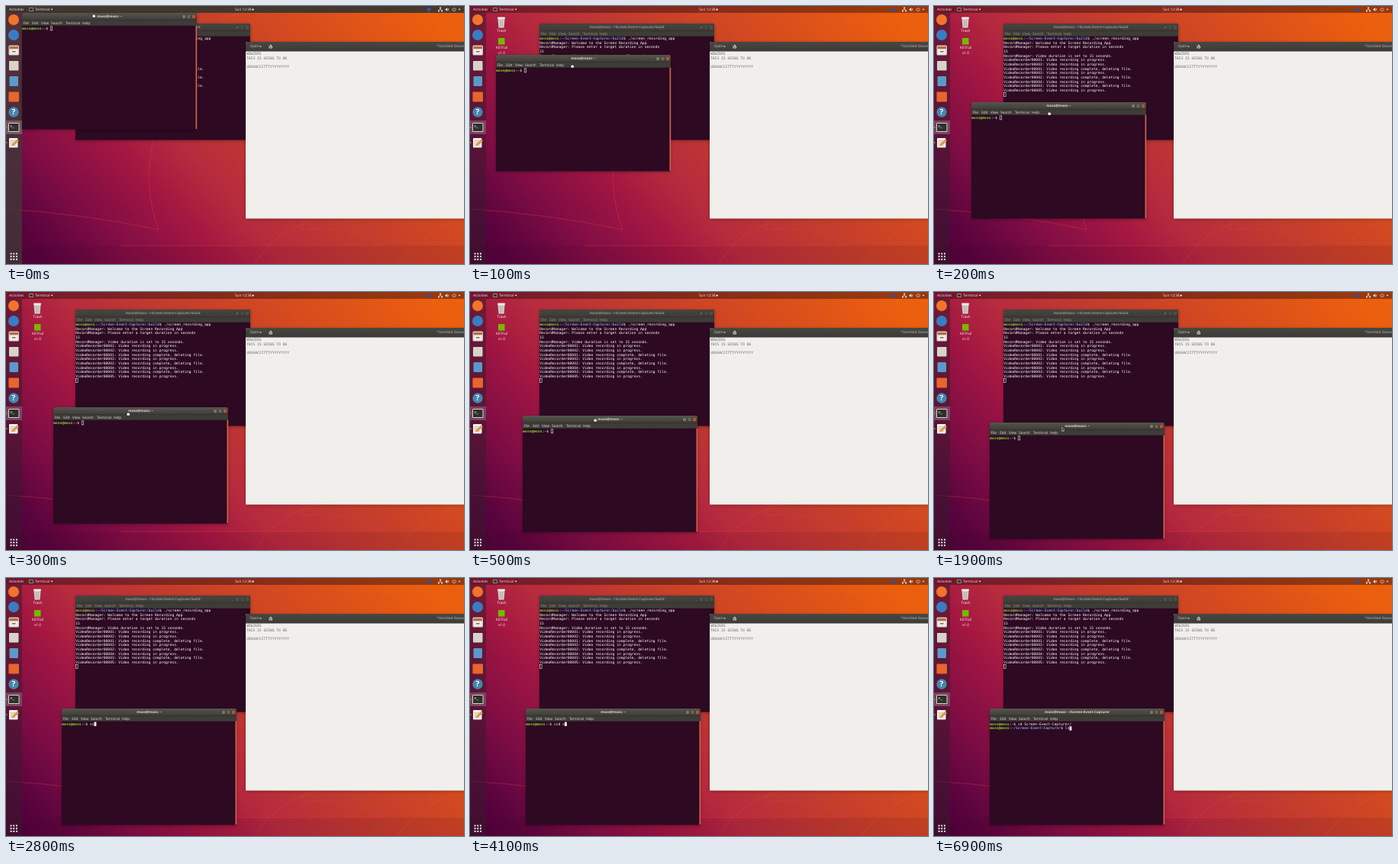
An HTML page with a canvas for the animation above (8 s loop, 600x338 px).

```html
<!DOCTYPE html>
<html lang="en">
<head>
<meta charset="utf-8">
<title>Desktop</title>
<style>
html, body { margin: 0; width: 100%; height: 100%; overflow: hidden; background: #a81247; }
canvas { display: block; width: 600px; height: 338px; }
</style>
</head>
<body>
<canvas id="stage"></canvas>
<script>
const W = 600, H = 338, LOOP = 8000;
const UI = '"Open Sans", "Noto Sans", sans-serif';
const MONO = '"DejaVu Sans Mono", "Liberation Mono", monospace';
const CELL = 2.815, LINE = 5.63;
const USER = 'moss@moss', DIR = '~/Screen-Event-Capturer';

const canvas = document.getElementById('stage');
const ctx = canvas.getContext('2d');
const dpr = window.devicePixelRatio || 1;
canvas.width = W * dpr;
canvas.height = H * dpr;
ctx.scale(dpr, dpr);
ctx.textBaseline = 'middle';
if ('textRendering' in ctx) ctx.textRendering = 'geometricPrecision';

// Drag steps: time, window x, window y, pointer x, pointer y
const drag = [
  [0, 21, 9, 115, 13],
  [100, 34, 64, 134, 79],
  [200, 49, 126, 151, 141],
  [300, 62, 151, 160, 160],
  [500, 69, 162, 164, 168],
  [600, 70, 165, 165, 170.5],
  [700, 71, 167, 166, 172],
  [800, 71, 168, 166, 173],
  [1600, 73, 171, 168, 177],
  [1900, 73, 171, 167.5, 177.5]
];

const typing = [[0, ''], [2700, 'c'], [2800, 'cc'], [4100, 'ccd s']];

const at = (steps, t) => steps.filter(s => s[0] <= t).pop();

function rect(x, y, w, h, fill) {
  ctx.fillStyle = fill;
  ctx.fillRect(x, y, w, h);
}

function round(x, y, w, h, r, fill) {
  ctx.fillStyle = fill;
  ctx.beginPath();
  ctx.roundRect(x, y, w, h, r);
  ctx.fill();
}

function dot(x, y, r, fill) {
  ctx.fillStyle = fill;
  ctx.beginPath();
  ctx.arc(x, y, r, 0, 7);
  ctx.fill();
}

function poly(points, fill, stroke) {
  ctx.beginPath();
  points.forEach(p => ctx.lineTo(...p));
  ctx.closePath();
  ctx.fillStyle = fill;
  ctx.fill();
  if (stroke) line('', stroke, 0.5, true);
}

function line(path, color, width, current) {
  ctx.strokeStyle = color;
  ctx.lineWidth = width;
  if (current) ctx.stroke();
  else ctx.stroke(new Path2D(path));
}

function text(s, x, y, color = '#eee', font = `4.7px ${UI}`, align = 'left') {
  ctx.font = font;
  ctx.textAlign = align;
  ctx.fillStyle = color;
  ctx.fillText(s, x, y);
}

function mono(s, x, y, color = '#fff', weight = '') {
  text(s, x, y, color, `${weight} 4.68px ${MONO}`);
  return x + s.length * CELL;
}

function wallpaper() {
  const g = ctx.createLinearGradient(0, 338, 470, -85);
  g.addColorStop(0, '#4a0038');
  g.addColorStop(0.08, '#58033d');
  g.addColorStop(0.19, '#7c0c44');
  g.addColorStop(0.33, '#a21642');
  g.addColorStop(0.43, '#b62a3e');
  g.addColorStop(0.58, '#c23b2e');
  g.addColorStop(0.76, '#d44a1f');
  g.addColorStop(1, '#ec5f0e');
  rect(0, 0, W, H, g);
  rect(0, 314, W, 24, 'rgba(60,0,25,.1)');
  line('M0 266Q100 272 200 293C180 240 182 175 220 110M150 314H496' +
    'M397 278Q384 288 389 293Q448 287 496 314', 'rgba(225,55,70,.4)', 1.2);
  line('M280 18Q345 -10 390 46M503 9Q492 25 485 46M326 338Q350 296 408 278' +
    'M512 338Q540 298 600 278', 'rgba(255,100,70,.28)', 0.7);
}

function desktopIcons() {
  poly([[36.5, 17], [45.5, 17], [44.5, 28.5], [37.5, 28.5]], '#d5cfcb');
  round(36, 14.5, 10, 2.6, 1, '#efebe8');
  line('M39 18L39.4 27M41 18V27M43 18L42.6 27', '#a29a98', 0.6);
  text('Trash', 41.5, 32.5, '#fff', undefined, 'center');
  rect(37, 42, 8.5, 8.5, '#76b900');
  text('KitTrial', 41.5, 55, '#fff', undefined, 'center');
  text('v1.0', 41.5, 61.5, '#fff', undefined, 'center');
}

function dock(solid) {
  rect(0, 9, 21, H - 9, solid ? 'rgba(66,54,56,.82)' : 'rgba(54,28,42,.5)');
  rect(0, 150, 21, 18, 'rgba(255,255,255,.2)');
  dot(10, 18, 7, '#f2742c');
  dot(10, 38, 7, '#397cc5');
  // file cabinet
  round(3.5, 51.5, 13.5, 13, 1.5, '#d8d0c5');
  rect(4.5, 53, 11.5, 3, '#b36d45');
  rect(5, 57, 10.5, 6.5, '#efebe4');
  rect(8, 59, 4.5, 1.5, '#77706a');
  round(4, 72, 12.5, 12.5, 1, '#d7d3c9');
  round(4.5, 92, 11.5, 13, 1, '#5a9acb');
  round(3.5, 112.5, 13.5, 13, 1, '#e7662b');
  dot(10, 139, 6.7, '#4585ad');
  text('?', 10, 139.3, '#fff', `bold 10px ${UI}`, 'center');
  // terminal launcher
  round(3, 153, 14.5, 12, 1.5, '#d6d3cb');
  rect(4, 154, 12.5, 10, '#302f2d');
  mono('>_', 5.5, 157.5, '#fff', 'bold');
  // editor launcher
  round(4, 173, 11.5, 12.5, 1, '#f1efea');
  for (let y = 176; y < 184; y += 2) rect(5.5, y, 7, 0.6, '#aaa69f');
  poly([[8, 181], [14.5, 174.5], [17, 177], [10, 183], [7.4, 183.3]], '#dd9c40');
  dot(0.7, 159, 0.9, '#ef6436');
  dot(0.7, 179, 0.9, '#ef6436');
  for (let i = 0; i < 9; i++)
    rect(5.6 + (i % 3) * 3.7, 323.5 + Math.floor(i / 3) * 3.7, 2, 2, '#f2edf0');
}

function panel(solid) {
  rect(0, 0, W, 9, solid ? 'rgba(56,54,48,.93)' : 'rgba(42,12,18,.45)');
  text('Activities', 4, 4.7, '#f0ecea');
  rect(30.5, 2.3, 5, 4.6, '#d8d4d0');
  rect(31, 2.8, 4, 3.6, '#333');
  text('Terminal', 38, 4.7, '#f0ecea');
  poly([[58.5, 3.8], [61.5, 3.8], [60, 5.6]], '#eee');
  text('Sun 12:38', 300, 4.7, '#f0ecea');
  dot(323.5, 4.6, 1.2, '#eee');
  dot(554, 4.6, 2.6, '#3d4e9d');
  rect(568, 1.7, 2, 1.5, '#eee');
  rect(566, 6, 1.7, 1.5, '#eee');
  rect(570.3, 6, 1.7, 1.5, '#eee');
  poly([[575.5, 3.8], [576.6, 3.8], [578.2, 2.2], [578.2, 7], [576.6, 5.5], [575.5, 5.5]], '#eee');
  line('M569 2.5V5M566.8 7V5H571.2V7M579.2 3Q580.5 4.6 579.2 6.2' +
    'M585.4 3A2.2 2.2 0 1 0 588.6 3M587 1.8V4.3', '#e6dfdc', 0.7);
  poly([[592.5, 3.8], [595.5, 3.8], [594, 5.6]], '#eee');
}

function frame(x, y, w, h, fill) {
  ctx.save();
  ctx.shadowColor = 'rgba(0,0,0,.3)';
  ctx.shadowBlur = 4 * dpr;
  ctx.shadowOffsetY = dpr;
  round(x, y, w, h, [2, 2, 0, 0], fill);
  ctx.restore();
}

function terminal(x, y, title, active) {
  const ink = active ? '#e4dfd7' : '#99958d';
  frame(x, y, 229, 152.5, '#2d0922');
  const g = ctx.createLinearGradient(0, y, 0, y + 9.5);
  g.addColorStop(0, active ? '#57554d' : '#464540');
  g.addColorStop(1, '#3d3c37');
  round(x, y, 229, 9.5, [2, 2, 0, 0], g);
  rect(x, y + 9.5, 229, 7.2, '#3d3c37');
  text(title, x + 114.5, y + 4.9, ink, `bold 4.5px ${UI}`, 'center');
  const signs = ['m-1 0h2', 'm-.9-.9h1.8v1.8h-1.8z', 'm-.8-.8l1.6 1.6m0-1.6l-1.6 1.6'];
  signs.forEach((sign, i) => {
    const bx = x + 212 + i * 6.5, close = active && i === 2;
    dot(bx, y + 5, 2.6, '#2f2e2a');
    dot(bx, y + 5, 2.2, close ? '#e95a31' : active ? '#85827a' : '#5b5952');
    line(`M${bx} ${y + 5}${sign}`, '#33312d', 0.5);
  });
  const menu = ['File', 'Edit', 'View', 'Search', 'Terminal', 'Help'];
  [1.5, 13.2, 25, 38, 57, 79].forEach((dx, i) => text(menu[i], x + dx, y + 13.5, ink));
  if (active) rect(x + 227.5, y + 16.7, 1.7, 135.3, '#cf664b');
}

function prompt(x, y, dir) {
  x = mono(USER, x, y, '#8ae234', 'bold');
  x = mono(':', x, y);
  x = mono(dir, x, y, '#729fcf', 'bold');
  return mono('$ ', x, y);
}

function caret(x, y, solid) {
  if (solid) return rect(x, y - 2.8, CELL, 5.4, '#fff');
  ctx.strokeStyle = '#eee';
  ctx.lineWidth = 0.6;
  ctx.strokeRect(x + 0.3, y - 2.6, CELL - 0.3, 5);
}

function recorder() {
  const x = 91, y = 43;
  terminal(x, 23, `${USER}: ${DIR}/build`, false);
  mono('./screen_recording_app', prompt(x + 0.3, y, DIR + '/build'), y);
  const say = s => 'RecordManager: ' + s;
  const start = n => `VideoRecorder0000${n}: Video recording in progress.`;
  const done = n => `VideoRecorder0000${n}: Video recording complete, deleting file.`;
  const lines = [
    say('Welcome to the Screen Recording App'),
    say('Please enter a target duration in seconds'),
    '15',
    say('Video duration is set to 15 seconds.'),
    start(1), start(2), done(1), start(3), done(2), start(4), done(3), start(5)
  ];
  lines.forEach((s, i) => mono(s, x + 0.3, y + (i + 1) * LINE));
  caret(x + 0.3, y + 13 * LINE, false);
}

function editor() {
  frame(314, 47, 300, 231.5, '#f0efeb');
  const g = ctx.createLinearGradient(0, 47, 0, 59);
  g.addColorStop(0, '#484741');
  g.addColorStop(1, '#3c3b37');
  round(314, 47, 300, 12.5, [2, 0, 0, 0], g);
  text('Open', 319.5, 53.2, '#c9c5bd');
  poly([[332, 52.3], [335, 52.3], [333.5, 54.2]], '#c9c5bd');
  rect(344.5, 52.5, 4.5, 3, '#c9c5bd');
  rect(345.7, 50.8, 2.2, 2, '#c9c5bd');
  rect(345.6, 53.4, 2.3, 1, '#45443f');
  text('*Untitled Document 1', 564.5, 53.2, '#99958d', `bold 4.5px ${UI}`);
  const ink = '#6d6b68';
  mono('WOWZERS', 315, 63, ink);
  mono('THIS IS GOING TO BE', 315, 68.7, ink);
  mono('UUUAACCITTTYYYYYYYYY', 315, 80, ink);
}

function pointer(x, y, hand) {
  ctx.save();
  ctx.translate(x, y);
  if (hand) {
    poly([[-2, 0], [-1.3, -1.2], [-0.5, -1.8], [0.6, -1.8], [1.7, -1.2],
      [2.3, 0.2], [1.9, 2], [-1.5, 2]], '#fff', '#222');
  } else {
    poly([[0, 0], [0, 4.8], [1.1, 3.8], [1.9, 5.4], [2.6, 5], [1.9, 3.5], [3.3, 3.4]], '#111', '#fff');
  }
  ctx.restore();
}

function shell(t, x, y) {
  const moved = t >= 6900;
  terminal(x, y, `${USER}: ${moved ? DIR : '~'}`, true);
  const tx = x + 0.3, ty = y + 20.5;
  let end = prompt(tx, ty, '~');
  if (moved) {
    mono('cd Screen-Event-Capturer/', end, ty);
    end = mono('ls', prompt(tx, ty + LINE, DIR), ty + LINE);
    caret(end, ty + LINE, true);
  } else {
    end = mono(at(typing, t)[1], end, ty);
    caret(end, ty, t >= 2700);
  }
}

function draw(t) {
  const [, x, y, px, py] = at(drag, t);
  const solid = t < 100;
  wallpaper();
  desktopIcons();
  dock(solid);
  panel(solid);
  recorder();
  editor();
  shell(t, x, y);
  if (t < 2700) pointer(px, py, t < 1900);
}

function tick() {
  draw(performance.now() % LOOP);
  requestAnimationFrame(tick);
}
tick();
</script>
</body>
</html>
```
